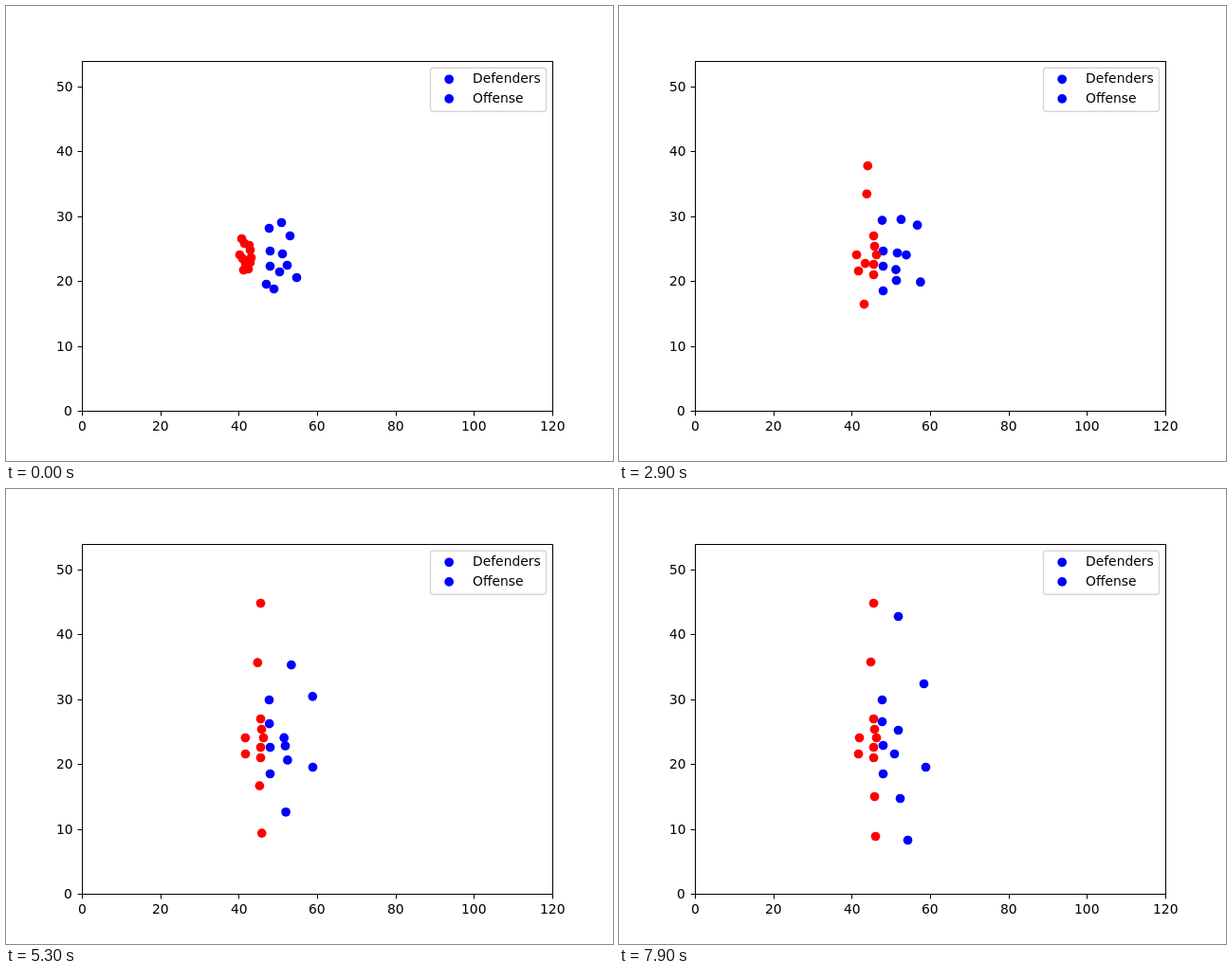
These frames come from a looping animation (640x480 px, 8000 ms). An HTML page with a canvas:

```html
<!DOCTYPE html>
<html lang="en">
<head>
<meta charset="utf-8">
<title>Defenders and offense</title>
<style>
  html, body { margin: 0; width: 100%; height: 100%; overflow: hidden; background: #fff; }
  canvas { display: block; width: 640px; height: 480px; }
</style>
</head>
<body>
<canvas id="stage" width="640" height="480"></canvas>
<script>
const ctx = document.getElementById('stage').getContext('2d');
const LOOP = 8000, STEP = 100;
const RED = '#f00', BLUE = '#00f';
const dots = [];

// Share of a move done at time t: full speed at first, slowing to a stop.
function ease(t, begin, end, power = 1.4) {
  const u = Math.min(1, Math.max(0, (t - begin) / (end - begin)));
  return 1 - (1 - u) ** power;
}

const move = (dx, dy, begin, end, power) => ({ dx, dy, begin, end, power });

// A player stands at x, y and adds up all of its moves.
function player(color, x, y, ...moves) {
  dots.push({ color, x, y, moves });
}

// Blockers step to their line at once and stay there.
function blocker(x, y, dx, dy) {
  player(RED, x, y, move(dx, dy, 0, 2400));
}

// Offense, upper side
player(BLUE, 277, 234, move(0, -12, 0, 5000));
player(BLUE, 290, 228, move(7, -9, 0, 2600), move(-1, 107, 2700, 7900));
player(BLUE, 299, 242, move(25, 0, 0, 6000), move(0, -37, 700, 7900, 1), move(-3, 0, 6000, 7900));
player(BLUE, 296, 273, move(7, -4, 0, 3500), move(0, -135, 2700, 7900), move(-9, 0, 4200, 7900, 1));

// Offense, middle
player(BLUE, 278, 258, move(-1, -13, 3500, 6000));
player(BLUE, 291, 261, move(2, -1, 0, 2000), move(-3, 19, 5000, 7900, 1));
player(BLUE, 278, 274, move(0, -4, 4600, 6400));
player(BLUE, 288, 280, move(6, -4, 0, 5000, 1), move(0, -22, 4700, 7900));

// Offense, lower side
player(BLUE, 282, 298, move(10, -9, 0, 2600, 1), move(0, 81, 3100, 7400), move(12, 0, 4600, 7900, 1));
player(BLUE, 274, 293, move(4, 7, 0, 2200));
player(BLUE, 306, 286, move(17, 7, 0, 5300));

// Defenders spreading out
player(RED, 249, 266, move(19, -146, 0, 5300));
player(RED, 248, 245, move(17, -63, 0, 6000, 2.1));
player(RED, 251, 250, move(5, 4, 0, 3000), move(13, 70, 2100, 6500));
player(RED, 246, 262, move(24, 104, 1100, 5700));
player(RED, 252, 271, move(-2, -9, 0, 2000), move(3, 0, 4600, 6000));

// Defenders holding the line
blocker(256, 252, 12, -10);
blocker(257, 257, 12, -4);
blocker(258, 265, 13, -3);
blocker(257, 270, 11, 2);
blocker(250, 278, 2, 1);
blocker(255, 277, 13, 6);

function disc(x, y, color) {
  ctx.fillStyle = color;
  ctx.beginPath();
  ctx.arc(x, y, 4.86, 0, 2 * Math.PI);
  ctx.fill();
}

function drawDot({ color, x, y, moves }, t) {
  for (const m of moves) {
    const k = ease(t, m.begin, m.end, m.power);
    x += m.dx * k;
    y += m.dy * k;
  }
  disc(x + 0.5, y + 0.5, color);
}

function line(x1, y1, x2, y2) {
  ctx.beginPath();
  ctx.moveTo(x1, y1);
  ctx.lineTo(x2, y2);
  ctx.stroke();
}

// Text starts on a whole pixel; shift is the part of its width left of x.
function label(text, x, y, shift) {
  ctx.fillStyle = '#000';
  const left = x - shift * ctx.measureText(text).width;
  ctx.fillText(text, Math.round(left), Math.round(y));
}

function drawAxes() {
  ctx.strokeStyle = '#000';
  ctx.lineWidth = 1;
  ctx.strokeRect(80.5, 58.5, 496, 369);
  for (let v = 0; v <= 120; v += 20) {
    const x = 80 + v * 496 / 120, px = Math.round(x) + 0.5;
    line(px, 427.5, px, 432.4);
    label(v, x, 448, 0.5);
  }
  for (let v = 0; v <= 50; v += 10) {
    const y = 427.2 - v * 369.6 / 54, py = Math.round(y) + 0.5;
    line(75.6, py, 80.5, py);
    label(v, 70.3, y + 5, 1);
  }
}

function drawLegend() {
  ctx.beginPath();
  ctx.roundRect(447.5, 65.3, 122, 46, 2.8);
  ctx.fillStyle = 'rgba(255,255,255,0.8)';
  ctx.fill();
  ctx.strokeStyle = 'rgba(204,204,204,0.8)';
  ctx.lineWidth = 1.39;
  ctx.stroke();
  ['Defenders', 'Offense'].forEach((name, i) => {
    disc(467.2, 77.3 + i * 20.6, BLUE);
    label(name, 491.6, 81 + i * 21, 0);
  });
}

function draw(t) {
  ctx.fillStyle = '#fff';
  ctx.fillRect(0, 0, 640, 480);
  ctx.font = '13.89px "DejaVu Sans", sans-serif';
  for (const dot of dots) drawDot(dot, t);
  drawAxes();
  drawLegend();
}

const start = performance.now();
function tick() {
  const t = (performance.now() - start) % LOOP;
  draw(Math.floor(t / STEP) * STEP);
  requestAnimationFrame(tick);
}
tick();
</script>
</body>
</html>
```
